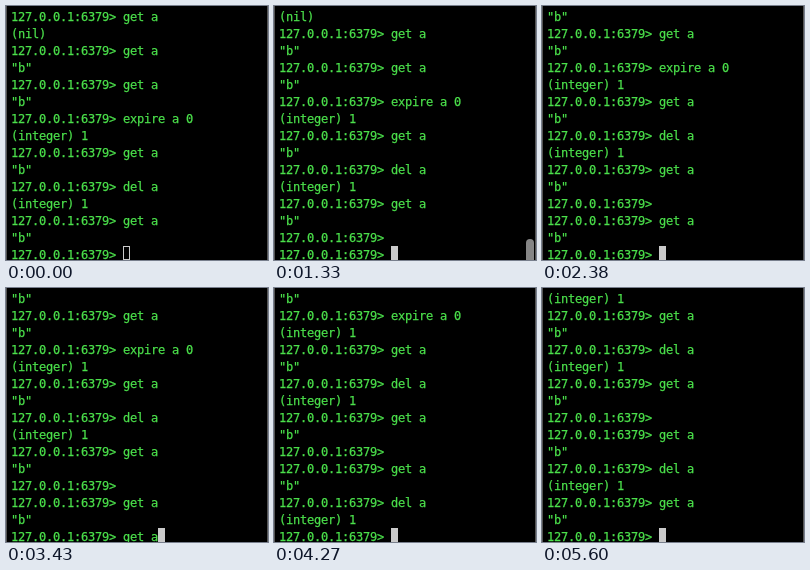
Recreate the animation shown at these times as an HTML page. Size 262x254 px, loop 6.72 s.

```html
<!DOCTYPE html>
<html lang="en">
<head>
<meta charset="utf-8">
<title>Terminal session</title>
<style>
  html, body { margin: 0; width: 100%; height: 100%; overflow: hidden; background: #000; }
  svg { display: block; width: 262px; height: 254px; }
  text {
    font: 12px "DejaVu Sans Mono", "Noto Sans Mono", monospace;
    letter-spacing: -0.224px; /* 7px cells */
    fill: #4be04b;
    stroke: #4be04b;
    stroke-width: 0.25px;
    white-space: pre;
  }
</style>
</head>
<body>
<svg viewBox="0 0 262 254" xmlns="http://www.w3.org/2000/svg">
  <rect width="262" height="254" fill="#000"/>
  <path d="M0.5 0V254M261.5 0V254" stroke="#555"/>
  <g id="screen"></g>
  <rect id="bar" x="252" y="233" width="8" height="40" rx="4" fill="#858585"/>
  <rect id="cursor" stroke="#cacaca" stroke-width="1"/>
</svg>
<script>
const LOOP = 6720, ROWS = 15, PITCH = 17, CELL = 7, LEFT = 5, BASE = 15;
const PROMPT = "127.0.0.1:6379> ";
const $ = id => document.getElementById(id);

// Commands with their replies; the first seven are on screen at the start.
const session = [
  ["get a", "(nil)"], ["get a", '"b"'], ["get a", '"b"'],
  ["expire a 0", "(integer) 1"], ["get a", '"b"'],
  ["del a", "(integer) 1"], ["get a", '"b"'],
  ["", ""], ["get a", '"b"'], ["del a", "(integer) 1"], ["get a", '"b"']
];
const START = 7;
const enterTimes = [1330, 2380, 4270, 5600];

// History recall: [time, text on the input line]
const input = [
  [0, ""], [1890, "get a"], [2380, ""], [3430, "get a"], [3640, "del a"],
  [4270, ""], [4900, "del a"], [5180, "get a"], [5600, ""]
];

const rows = Array.from({ length: ROWS }, (_, i) => {
  const row = document.createElementNS("http://www.w3.org/2000/svg", "text");
  row.setAttribute("x", LEFT);
  row.setAttribute("y", BASE + i * PITCH);
  return $("screen").appendChild(row);
});

function set(el, attrs) {
  for (const key in attrs) el.setAttribute(key, attrs[key]);
}

function barOpacity(t) {
  if (t < 1330 || t >= 2030) return 0;
  if (t < 1820) return 1;
  return 1 - (Math.floor((t - 1820) / 70) + 1) / 4;
}

function draw(t) {
  const done = START + enterTimes.filter(e => t >= e).length;
  const typed = input.filter(step => t >= step[0]).pop()[1];
  const lines = session.slice(0, done)
    .flatMap(([cmd, reply]) => reply ? [PROMPT + cmd, reply] : [PROMPT + cmd]);
  lines.push(PROMPT + typed);

  const visible = lines.slice(-ROWS);
  rows.forEach((row, i) => {
    if (row.textContent !== visible[i]) row.textContent = visible[i];
  });

  const x = LEFT + CELL * (PROMPT.length + typed.length);
  set($("cursor"), {
    x: x + 0.5, y: 240.5, width: 6, height: 13,
    fill: t < 210 ? "none" : "#cacaca"
  });
  set($("bar"), { opacity: barOpacity(t) });
}

const began = performance.now();
function frame() {
  draw((performance.now() - began) % LOOP);
  requestAnimationFrame(frame);
}
frame();
</script>
</body>
</html>
```
